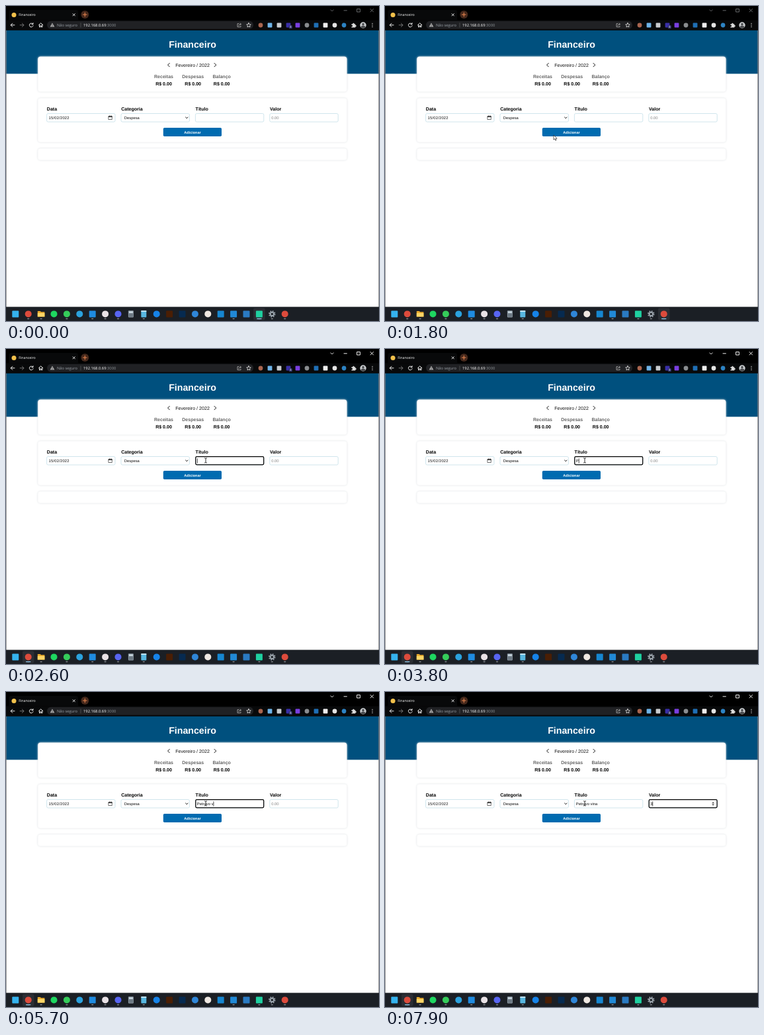
Write an HTML page that moves like this. It is 564 by 476 pixels and loops after 8 s.

```html
<!DOCTYPE html>
<html lang="pt-BR">
<head>
<meta charset="utf-8">
<title>Financeiro</title>
<style>
html, body { margin: 0; width: 564px; height: 476px; overflow: hidden; background: #fff; }
svg { display: block; text-rendering: geometricPrecision; }
text { font: 5.85px "Liberation Sans", Arial, sans-serif; fill: #111; }
.ui text { font: 5.8px "Open Sans", "Noto Sans", sans-serif; }
text.title { font-size: 14.2px; font-weight: 700; fill: #fff; }
text.label { font-size: 7.05px; font-weight: 700; fill: #000; }
text.dim { fill: #666; }
text.hint { fill: #858585; }
.mid { text-anchor: middle; }
.line { fill: none; stroke-width: 1; stroke-linecap: round; stroke-linejoin: round; }
.card { fill: #fff; filter: drop-shadow(0 0 1.7px #dcdfe2); }
.field { fill: #fff; stroke: #bcdbe6; stroke-width: .7; }
.ring { fill: none; stroke: #000; stroke-width: 1.25; }
</style>
</head>
<body>
<svg width="564" height="476" viewBox="0 0 564 476">
  <rect width="564" height="476" fill="#fff"/>

  <!-- page -->
  <rect y="36" width="564" height="66.4" fill="#00507e"/>
  <text class="title mid" x="282" y="63">Financeiro</text>
  <rect class="card" x="48.3" y="76.6" width="467.1" height="53" rx="4"/>
  <rect class="card" x="48.3" y="139.3" width="467.1" height="66.5" rx="4"/>
  <rect class="card" x="48.3" y="215.3" width="467.1" height="17.5" rx="4"/>
  <path class="line" stroke="#111" d="M247.3 86.4l-2.7 2.7 2.7 2.7M315 86.4l2.7 2.7-2.7 2.7"/>
  <text class="mid" x="282" y="91.9" style="font-size:7.1px">Fevereiro / 2022</text>
  <g id="totals"></g>
  <g id="fields"></g>
  <text x="64.6" y="171" letter-spacing=".19">15/02/2022</text>
  <g class="line" stroke="#111"><path d="M155.3 166.6h5v4.9h-5zM156.6 165.7v1M159 165.7v1" stroke-width=".6"/><path d="M155.3 167.3h5"/></g>
  <text x="178.8" y="171">Despesa</text>
  <path class="line" stroke="#111" d="M271.6 168l1.7 1.7 1.7-1.7"/>
  <rect x="237.8" y="184" width="88.2" height="13" rx="1.8" fill="#006bb0"/>
  <text class="mid" x="282" y="192.7" style="font-size:5.5px;font-weight:700;fill:#fff">Adicionar</text>
  <text id="name" x="288.8" y="171" xml:space="preserve"></text>
  <text id="value" x="401.2" y="171"></text>
  <g id="spin" fill="#444"><path d="M494.3 168.2l1.8-2.2 1.8 2.2zM494.3 169.6l1.8 2.2 1.8-2.2z"/></g>
  <rect id="ringName" class="ring" x="286.8" y="162.6" width="102.9" height="12.2" rx="1.7"/>
  <rect id="ringValue" class="ring" x="399.2" y="162.6" width="102.9" height="12.2" rx="1.7"/>
  <rect id="caret" y="165.4" width=".7" height="7.2" fill="#000"/>
  <path d="M.4 36v419M563.6 36v419" stroke="#777" stroke-width=".8"/>

  <!-- browser chrome -->
  <g class="ui">
    <rect width="564" height="36.8" fill="#08090a"/>
    <rect width="564" height="21.5" fill="#000"/>
    <path d="M2 21.6q2.5 0 2.5-2.5V9q0-3 3-3H106q3 0 3 3V19q0 2.6 2.5 2.6z" fill="#08090a"/>
    <circle cx="12" cy="13.5" r="3.5" fill="#f2c14b"/>
    <text x="19.2" y="15.4" style="font-size:5.3px;fill:#fff">Financeiro</text>
    <path class="line" stroke="#eee" stroke-width=".8" d="M101.1 11.7l3.2 3.2m0-3.2l-3.2 3.2"/>
    <circle cx="119.3" cy="13" r="6" fill="#46291c"/>
    <path class="line" stroke="#ef8a52" d="M116.5 13h5.6M119.3 10.2v5.6"/>
    <path id="controls" class="line" stroke-width=".8" d="M491 5.8l2 2 2-2M511 6.8h4.4M531 4.4h4.4v4.6h-4.4zM551 4.4l4.5 4.5m0-4.5l-4.5 4.5"/>
    <rect x="62" y="22.8" width="312" height="12" rx="6" fill="#202124"/>
    <g class="line" stroke="#eee">
      <path d="M13 28.8H7.2m2.6-2.6l-2.6 2.6 2.6 2.6"/>
      <path d="M21.2 28.8H27m-2.6-2.6l2.6 2.6-2.6 2.6" stroke="#777"/>
      <path d="M40.6 27.2a2.9 2.9 0 1 0 .5 2.4M41 25.6v2h-2"/>
      <path d="M49.6 28.7l3.1-2.9 3.1 2.9M50.5 28.5v3.3h1.5v-2h1.4v2h1.5v-3.3"/>
    </g>
    <path d="M70 25.6l3.4 6h-6.8z" fill="#aaa"/>
    <path d="M70 27.7v1.8m0 .6v.7" stroke="#202124" stroke-width=".7"/>
    <text x="77" y="30.9" style="fill:#9aa0a6">Não seguro</text>
    <path d="M113 25.4v7" stroke="#666" stroke-width=".6"/>
    <text x="117" y="30.9" style="fill:#fff">192.168.0.69<tspan fill="#8d9297">:3000</tspan></text>
    <g class="line" stroke-width=".8">
      <path stroke="#999" d="M352 26.6h-2v5h5v-1.4M351.6 29.7q.4-2.3 3.9-2.3m-1.4-1.4l1.4 1.4-1.4 1.4"/>
      <path stroke="#ccc" d="M367 25.6l1 2.1 2.3.3-1.7 1.6.4 2.3-2-1.1-2 1.1.4-2.3-1.7-1.6 2.3-.3z"/>
    </g>
    <g id="tools"></g>
    <rect x="427.8" y="29.2" width="5" height="5" rx="1" fill="#2b2e66"/>
    <text class="mid" x="430.3" y="33.4" style="font-size:4.6px;fill:#fff">8</text>
    <path d="M522.4 27.2h2a1.1 1.1 0 1 1 2.1 0h1.8v1.9a1.1 1.1 0 1 1 0 2.1v1.4h-5.9v-1.6a1.1 1.1 0 1 0 0-2z" fill="#ddd"/>
    <circle cx="540" cy="29" r="4.7" fill="#c9ccce"/>
    <path d="M536.4 32a3.7 3.2 0 0 1 7.2 0 4.7 4.7 0 0 1-7.2 0" fill="#4b4d50"/>
    <circle cx="540" cy="27.6" r="1.8" fill="#4b4d50"/>
    <g fill="#ddd"><circle cx="554" cy="26.5" r=".7"/><circle cx="554" cy="29" r=".7"/><circle cx="554" cy="31.5" r=".7"/></g>
  </g>

  <!-- taskbar -->
  <rect y="454.6" width="564" height="21.4" fill="#1b1f25"/>
  <rect id="hover" x="412.7" y="456.4" width="17.5" height="18" rx="2" fill="#fff" opacity=".07"/>
  <rect id="active" y="456.4" width="17.5" height="18" rx="2" fill="#fff" opacity=".07"/>
  <g id="tasks"></g>
  <rect id="mark" y="472" width="7.4" height="1.3" rx=".6" fill="#8fc7e8"/>

  <path id="arrow" d="M0 0v7.2l1.7-1.5 1.1 2.5 1.2-.5-1.1-2.5h2.2z" fill="#fff" stroke="#000" stroke-width=".6"/>
  <path id="beam" class="line" stroke="#333" stroke-width=".75" d="M-1.5-3.6q1.5 0 1.5.8 0-.8 1.5-.8M0-2.8V2.8M-1.5 3.6q1.5 0 1.5-.8 0 .8 1.5.8"/>
</svg>
<script>
const $ = id => document.getElementById(id);
const show = (id, on) => { $(id).style.display = on ? '' : 'none'; };
const put = (id, html) => { $(id).innerHTML = html; };
const square = (x, y, s, fill) =>
  `<rect x="${x - s / 2}" y="${y - s / 2}" width="${s}" height="${s}" rx="1" fill="${fill}"/>`;
const disc = (x, y, s, fill) => `<circle cx="${x}" cy="${y}" r="${s / 2}" fill="${fill}"/>`;

put('totals', ['Receitas', 'Despesas', 'Balanço'].map((name, i) => {
  const x = [238.5, 282.7, 326.2][i];
  return `<text class="label dim mid" x="${x}" y="109.3">${name}</text>
    <text class="label mid" x="${x}" y="119.5">R$ 0.00</text>`;
}).join(''));

put('fields', ['Data', 'Categoria', 'Título', 'Valor'].map((name, i) => {
  const x = 61.6 + i * 112.4;
  return `<text class="label" x="${x + .2}" y="158.2">${name}</text>
    <rect class="field" x="${x}" y="162.5" width="103.4" height="12.6" rx="2"/>`;
}).join(''));

const tools = [
  [disc, '#a9654f'], [square, '#6fb4e8'], [square, '#c9cccf'], [square, '#3a2fa8'],
  [square, '#7a3fe0'], [disc, '#8a8d90'], [square, '#1f6fb5'], [square, '#eee'],
  [disc, '#e4e4e4'], [disc, '#2d83c4']
];
put('tools', tools.map(([draw, fill], i) => draw(385 + i * 14, 29, 6.8, fill)).join(''));

const folder = x => `<path d="M${x - 5.3} 461h4l1.2 1.3h5.4v7.2h-10.6z" fill="#e8a92c"/>
  <path d="M${x - 5.3} 464h10.6v5.5h-10.6z" fill="#fcd667"/>`;
const calc = x => `<rect x="${x - 4}" y="460.3" width="8" height="10.2" rx="1" fill="#8b98a3"/>
  <path d="M${x - 2.8} 462.6h5.6" stroke="#dceaf2" stroke-width="1.8"/>
  <path d="M${x - 2.8} 465.9h5.6M${x - 2.8} 468.3h5.6" stroke="#303a43" stroke-width="1.3" stroke-dasharray="1.3 .85"/>`;
const notes = x => `<rect x="${x - 4}" y="460.2" width="8" height="10.2" rx="1" fill="#58b7e0"/>
  <path d="M${x - 4} 461.2h8" stroke="#d8eef8" stroke-width="1.6"/>`;
const gear = x => `<circle cx="${x}" cy="465.4" r="4.3" fill="none" stroke="#9aa3ab" stroke-width="1.9" stroke-dasharray="1.7 1.68"/>
  <circle cx="${x}" cy="465.4" r="2.7" fill="none" stroke="#9aa3ab" stroke-width="2"/>`;

// shape, colour, running
const tasks = [
  [square, '#35b3ee'], [disc, '#dc4b3c', 1], [folder, '', 1], [disc, '#1ed760'],
  [disc, '#35cc5a', 1], [disc, '#2ba2de'], [square, '#1f8be0', 1], [disc, '#e8e2e6', 1],
  [disc, '#5865f2', 1], [calc], [notes, '', 1], [disc, '#1683e8'],
  [square, '#4a1e04'], [square, '#062a50'], [disc, '#2f86d8'], [disc, '#efe8e2'],
  [square, '#1686d0'], [square, '#2189d6', 1], [square, '#2a7ac2'], [square, '#1fd0a0', 1],
  [gear, '', 1], [disc, '#dc4b3c', 1]
];
const taskX = i => 14.3 + i * 19.4;
put('tasks', tasks.map(([draw, fill, running], i) => {
  const x = taskX(i);
  const icon = fill ? draw(x, 465.4, 10, fill) : draw(x);
  return icon + (running ? `<rect x="${x - 1.6}" y="472" width="3.2" height="1.2" rx=".6" fill="#8c9196"/>` : '');
}).join(''));

// pointer path: time, x, y
const path = [
  [300, 559, 56], [500, 540, 200], [700, 480, 390], [900, 428, 466], [1000, 428, 466],
  [1200, 419.5, 470], [1300, 419.5, 470], [1400, 416, 462], [1600, 350, 330],
  [1800, 255, 195], [1900, 225, 164], [2000, 200, 171], [2100, 203, 171],
  [2200, 228, 170], [2300, 277, 168], [2400, 302, 168.4]
];
const WORDS = 'Petruvo vina';
const keys = [3800, 4000, 4200, 4400, 4600, 4700, 4900, 5200, 5700, 6400, 6500, 6500];
const blinks = [[2600, 3100], [3600, 6200], [6400, 7400], [7900, 8000]];

function pointer(t) {
  const i = path.findIndex(p => p[0] > t);
  if (i < 0) return path[path.length - 1].slice(1);
  const [t0, x0, y0] = path[Math.max(0, i - 1)], [t1, x1, y1] = path[i];
  const k = t1 > t0 ? (t - t0) / (t1 - t0) : 0;
  return [x0 + (x1 - x0) * k, y0 + (y1 - y0) * k];
}

function render(t) {
  const focused = t >= 2600, onValue = t >= 6900, typed = t >= 7900;
  const [x, y] = pointer(t);
  const inText = t >= 2300 && x > 287;
  show('arrow', t >= 300 && !inText);
  show('beam', inText);
  $(inText ? 'beam' : 'arrow').setAttribute('transform', `translate(${x} ${y})`);

  const task = taskX(t < 1300 ? 19 : focused ? 1 : 21);
  $('active').setAttribute('x', task - 8.75);
  $('mark').setAttribute('x', task - 3.7);
  show('hover', t >= 900 && t < 1500);
  $('controls').setAttribute('stroke', focused ? '#f0f0f0' : '#66686b');

  $('name').textContent = WORDS.slice(0, keys.filter(k => k <= t).length);
  $('value').textContent = typed ? '3' : '0.00';
  $('value').setAttribute('class', typed ? '' : 'hint');
  show('ringName', focused && !onValue);
  show('ringValue', onValue);
  show('spin', onValue);

  const field = $(onValue ? 'value' : 'name');
  const width = onValue && !typed ? 0 : field.getComputedTextLength();
  $('caret').setAttribute('x', (onValue ? 401.2 : 288.9) + width);
  show('caret', blinks.some(([a, b]) => t >= a && t < b));
}

const start = performance.now();
function tick() {
  const t = (performance.now() - start) % 8000;
  render(Math.floor(t / 100) * 100);
  requestAnimationFrame(tick);
}
tick();
</script>
</body>
</html>
```
